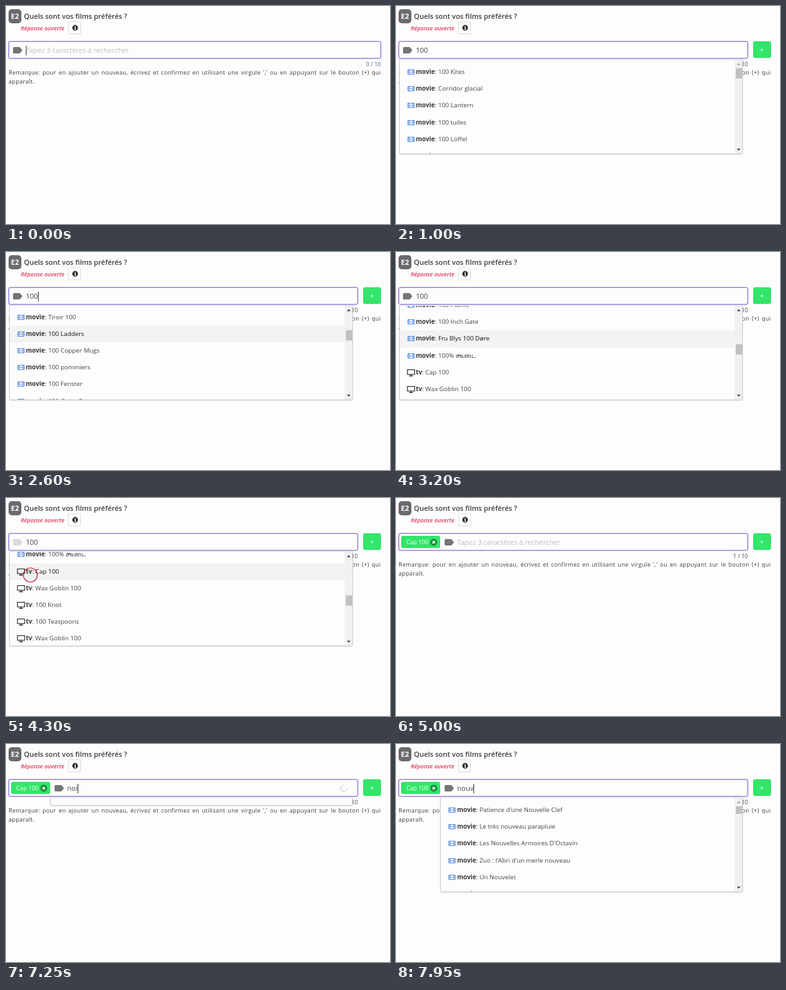
Write an HTML page that moves like this. It is 600 px wide and 340 px high and loops after 8 s.

```html
<!DOCTYPE html>
<html lang="fr">
<head>
<meta charset="utf-8">
<title>Recherche</title>
<style>
html, body { margin: 0; width: 100%; height: 100%; overflow: hidden; background: #fdfdfd; }
#stage {
  position: relative; width: 600px; height: 340px; overflow: hidden;
  background: #fdfdfd; color: #444;
  font-family: "Open Sans", "Noto Sans", "Noto Sans Tamil", sans-serif;
}
#stage div, #stage svg { position: absolute; box-sizing: border-box; }
.t { white-space: pre; line-height: 20px; }
[hidden] { display: none !important; }

#badge { left: 4px; top: 5px; width: 20px; height: 22px; border-radius: 5px; background: #6c6a6e;
  color: #fff; font-size: 11px; font-weight: 700; line-height: 22px; text-align: center; }
#title { left: 28px; top: 6.4px; font-size: 11px; font-weight: 600; color: #3c3c3c; }
#kind { left: 23px; top: 24.5px; font-size: 9px; font-weight: 600; font-style: italic; color: #e0395c; }
#info { left: 97px; top: 24px; width: 20px; height: 20px; border: 1px solid #dcdcdc; border-radius: 2px; }
#count { top: 81px; font-size: 8.8px; }
.note { left: 4px; width: 581.5px; font-size: 9.1px; letter-spacing: .3px; color: #404040; }
#note1 { top: 93.5px; text-align-last: justify; white-space: nowrap; }
#note2 { top: 107.5px; }

#field { left: 4px; top: 54.5px; height: 27px; border: 1.5px solid #8a6fdc;
  border-radius: 3px; background: #fdfdfd; box-shadow: 0 0 1.5px .3px #a797e4; }
#add { left: 558px; top: 55px; width: 27.5px; height: 26px; border-radius: 3px; background: #33e569;
  color: #fff; font-size: 11px; line-height: 26px; text-align: center; }
#chip { left: 8px; top: 59px; width: 61px; height: 19px; border-radius: 3px; background: #33e569; color: #fff; }
#chip .t { left: 8px; top: -.5px; font-size: 9.2px; }
#entry { left: 0; top: 0; }
#tag { left: 11px; top: 63.6px; }
#typed { left: 31px; top: 59px; font-size: 11px; }
#typed i { display: inline-block; width: 1px; height: 15px; margin-right: -1px; background: #333; vertical-align: -3.5px; }
#typed b { font-weight: 400; color: #bdbdbd; }

#drop { top: 83px; background: #fdfdfd; border: 1px solid #cfcfcf; border-top-color: #e2e2e2;
  border-radius: 0 0 3px 3px; box-shadow: 0 1px 2px #0002; overflow: hidden; }
.row { left: 0; width: 525px; height: 26.2px; }
.row .t { left: 25.4px; top: 3px; font-size: 9.8px; }
.row b { font-weight: 700; color: #3a3a3a; }
.row.on { background: #f3f3f3; color: #111; }
#bar { right: 0; top: 0; width: 12px; height: 146px; background: #f1f1f1; }
#thumb { left: 1.5px; width: 10px; background: #c1c1c1; }
</style>
</head>
<body>
<div id="stage">
  <div id="badge">E2</div>
  <div id="title" class="t">Quels sont vos films préférés ?</div>
  <div id="kind" class="t">Réponse ouverte</div>
  <div id="info">
    <svg style="left:4.5px;top:4.3px" width="10" height="10" viewBox="0 0 10 10">
      <circle cx="5" cy="5" r="4.4" fill="#2a2a2a"/>
      <path d="M4 4.4H5.4V7.4M3.9 7.4H6.3M4.4 2.6H5.6" fill="none" stroke="#fff" stroke-width="1.2"/>
    </svg>
  </div>
  <div id="count" class="t"></div>
  <div id="note1" class="note t">Remarque: pour en ajouter un nouveau, écrivez et confirmez en utilisant une virgule ',' ou en appuyant sur le bouton (+) qui</div>
  <div id="note2" class="note t">apparaît.</div>

  <div id="field"></div>
  <div id="add">+</div>
  <div id="chip">
    <div class="t">Cap 100</div>
    <svg style="left:45px;top:3.5px" width="12" height="12" viewBox="-6 -6 12 12">
      <circle r="5.4" fill="#178a3a"/>
      <path d="M-2-2 2 2M2-2-2 2" stroke="#fff" stroke-width="1.6"/>
    </svg>
  </div>
  <div id="entry">
    <svg id="tag" width="15" height="10" viewBox="0 0 15 10">
      <path d="M1.5 0H9.5Q10.5 0 11.2.8L14.6 5 11.2 9.2Q10.5 10 9.5 10H1.5Q0 10 0 8.5V1.5Q0 0 1.5 0Z"/>
    </svg>
    <div id="typed" class="t"><span></span><i></i><b>Tapez 3 caractères à rechercher</b></div>
  </div>
  <svg id="spin" style="left:521px;top:62px" width="14" height="14" viewBox="-7 -7 14 14">
    <path d="M0-5A5 5 0 1 0 5 0" fill="none" stroke="#d2d2d2" stroke-width="1.2"/>
  </svg>

  <div id="drop">
    <div id="list"></div>
    <div id="bar">
      <svg width="12" height="146" viewBox="0 0 12 146">
        <path id="up" d="M3.5 8.2 6.5 5 9.5 8.2Z"/>
        <path d="M3.5 138.4 6.5 141.6 9.5 138.4Z" fill="#444"/>
      </svg>
      <div id="thumb"></div>
    </div>
  </div>
  <svg id="click" style="left:0;top:0" width="600" height="340">
    <circle cx="38" cy="120" fill="none" stroke="#c8203c" stroke-width="1.2"/>
  </svg>
</div>

<script>
const LOOP = 8000, PITCH = 26.2, PAD = 6, TOP = 84, NOTCH = 73.2, SHIFT = 64.5;
const PICKED = 4500;
const $ = id => document.getElementById(id);

const icons = {
  movie: `<svg style="left:12px;top:9px" width="11" height="8" viewBox="0 0 11 8" fill="none" stroke="#4a84dc" stroke-width=".9">
    <path d="M.5.5H10.5V7.5H.5ZM2.8.5V7.5M8.2.5V7.5M2.8 4H8.2"/>
    <path d="M1.65 1V7M9.35 1V7" stroke-dasharray="1 1"/></svg>`,
  tv: `<svg style="left:11px;top:8px" width="13" height="11" viewBox="0 0 13 11" fill="none" stroke="#3a3a3a">
    <path d="M.9.7H12.1V7.8H.9Z" stroke-width="1.3"/><path d="M6.5 8V10M3.5 10.2H9.5" stroke-width="1.4"/></svg>`
};

const hundreds = [
  "100 Kites", "Corridor glacial", "100 Lantern", "100 tuiles", "100 Löffel",
  "100 Pebbles", "100 Umbrellas", "100 bougies", "100 Gärten", "Tiroir 100",
  "100 Ladders", "100 Copper Mugs", "100 pommiers", "100 Fenster", "100 Quiet Ovens",
  "100 Wagons", "100 Plums", "100 Inch Gate", "Fru Blys 100 Døre", "100% கூடை",
  "tv:Cap 100", "tv:Wax Goblin 100", "tv:100 Knot", "tv:100 Teaspoons", "tv:Wax Goblin 100",
  "tv:100 Ribbons", "tv:100 Shelves"
];
const novelties = [
  "Patience d'une Nouvelle Clef", "Le très nouveau parapluie", "Les Nouvelles Armoires D'Octavin",
  "Zuo : l'Abri d'un merle nouveau", "Un Nouvelet", "La nouvelle brouette"
];

function makeList(items) {
  const group = document.createElement("div");
  items.forEach((item, i) => {
    const tv = item.startsWith("tv:"), kind = tv ? "tv" : "movie";
    const row = document.createElement("div");
    row.className = "row";
    row.style.top = PAD + i * PITCH + "px";
    row.innerHTML = `${icons[kind]}<div class="t"><b>${kind}</b>: ${tv ? item.slice(3) : item}</div>`;
    group.append(row);
  });
  $("list").append(group);
  return group;
}
const first = makeList(hundreds), second = makeList(novelties);

const keys = [
  [-250, ""], [50, "1"], [200, "10"], [350, "100"], [PICKED, ""],
  [6650, "n"], [6900, "no"], [7150, "noi"], [7350, "no"], [7450, "nou"], [7650, "nouv"]
];
const notches = [1950, 2150, 2350, 2550, 2750, 2950, 3500];

const within = (t, a, b) => t >= a && t < b;
const ease = x => { x = Math.min(1, Math.max(0, x)); return x * x * (3 - 2 * x); };
const show = (el, on) => el.toggleAttribute("hidden", !on);

function drawField(t) {
  const [since, text] = keys.filter(k => k[0] <= t).pop();
  const [typed, caret, hint] = $("typed").children;
  const picked = t >= PICKED, wide = t < 50;
  typed.textContent = text;
  caret.style.visibility = (t - since) % 1000 < 500 ? "visible" : "hidden";
  show(hint, !text);
  show($("chip"), picked);
  show($("add"), !wide);
  $("entry").style.left = (picked ? SHIFT : 0) + "px";
  $("field").style.width = (wide ? 582 : 546) + "px";
  $("count").style.right = (wide ? 14.5 : 50.3) + "px";
  $("count").style.color = wide ? "#3f668f" : "#444";
  $("count").textContent = (picked ? 1 : 0) + " / 10";
  $("tag").style.fill = within(t, 4250, PICKED) ? "#dadada" : "#757575";
}

function drawDrop(t) {
  const picked = t >= PICKED;
  const loading = within(t, 350, 900) || within(t, 7150, 7450);
  const open = within(t, 350, PICKED) || t >= 7150;
  const left = 4.5 + (picked ? SHIFT : 0);
  const scroll = picked ? 0 : NOTCH * notches.reduce((sum, n) => sum + ease((t - n) / 160), 0);
  const drop = $("drop").style;
  show($("drop"), open);
  drop.left = left + "px";
  drop.width = 542.2 - left + "px";
  drop.height = (loading ? 13 : 147.5) + "px";
  show($("list"), !loading);
  show($("bar"), !loading);
  show(first, !picked);
  show(second, picked);
  first.style.top = -scroll + "px";
  $("thumb").style.top = 12.5 + scroll * .108 + "px";
  $("thumb").style.height = (picked ? 12.5 : 16) + "px";
  $("up").style.fill = scroll ? "#444" : "#a5a5a5";

  const pointer = 135 - 15 * ease((t - 3700) / 400);
  const hover = t < 1950 ? -1 : Math.floor((pointer - TOP - PAD + scroll) / PITCH);
  [...first.children].forEach((row, i) => row.classList.toggle("on", i === hover));

  show($("spin"), loading);
  $("spin").style.transform = `rotate(${(t - 7250) * .6}deg)`;
}

function drawClick(t) {
  const p = (t - 4250) / 250;
  show($("click"), p >= 0 && p < 1);
  const ring = $("click").firstElementChild;
  ring.setAttribute("r", 10.2 + 4 * Math.max(0, p));
  ring.style.opacity = p < .4 ? 1 : (1 - p) / .6;
}

function frame(now) {
  const t = now % LOOP;
  drawField(t);
  drawDrop(t);
  drawClick(t);
  requestAnimationFrame(frame);
}
frame(0);
</script>
</body>
</html>
```
